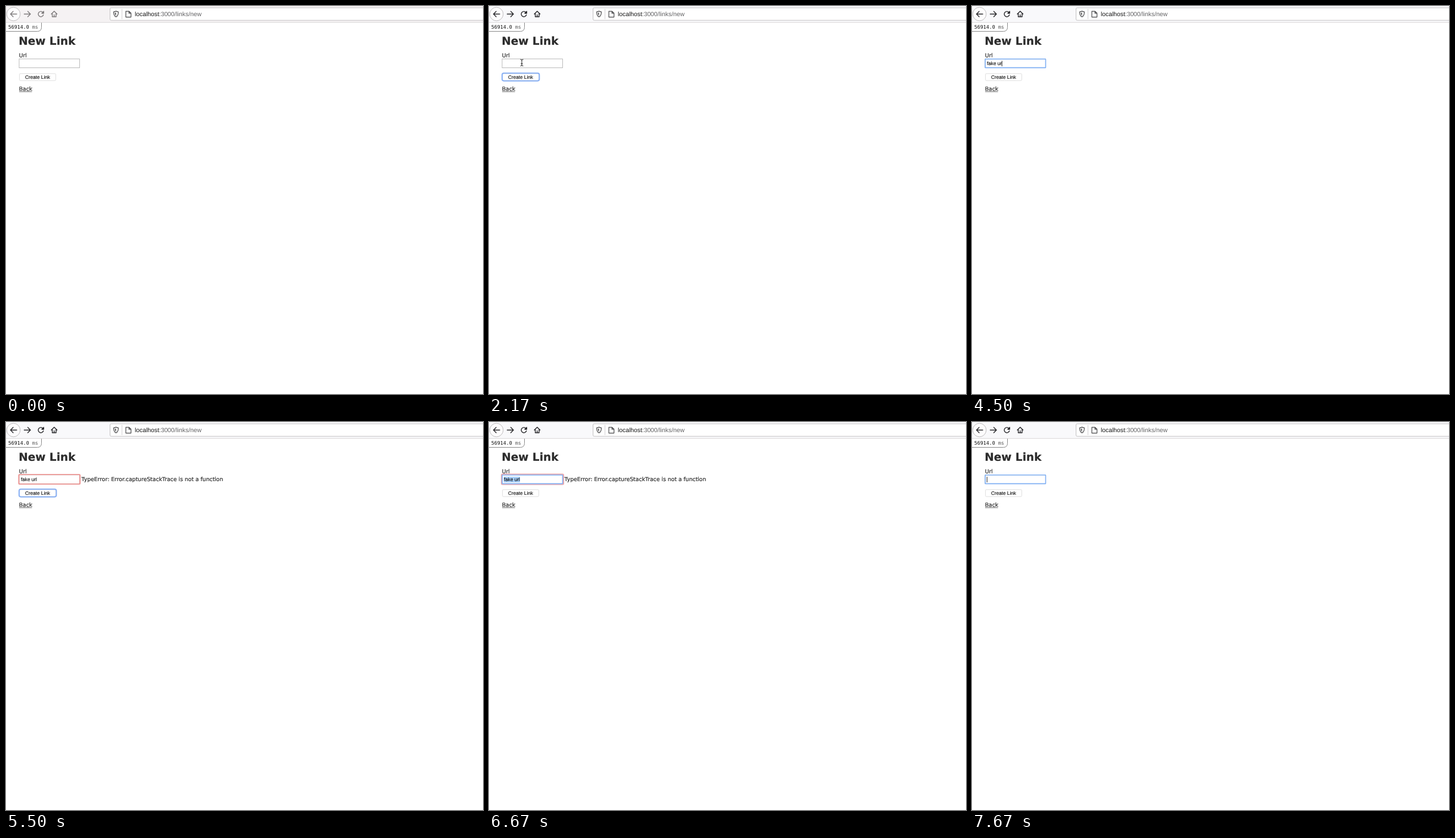
These frames come from a looping animation (800x650 px, 8000 ms). An HTML page:

```html
<!DOCTYPE html>
<html lang="en">
<head>
<meta charset="utf-8">
<title>New Link form</title>
<style>
  html, body { margin: 0; width: 100%; height: 100%; overflow: hidden; background: #fff; }
  svg { display: block; width: 800px; height: 650px; }
  text { white-space: pre; font-kerning: none; text-rendering: geometricPrecision; }
  .page { font: 9.25px "DejaVu Sans", sans-serif; fill: #2c2c2c; stroke: #2c2c2c; stroke-width: .2; }
  .ui { font: 8.2px "Liberation Sans", sans-serif; fill: #0c0c0c; stroke: #0c0c0c; stroke-width: .12; }
  .mono { font: 8.3px "DejaVu Sans Mono", monospace; fill: #111; }
  .address { font: 10.33px "Liberation Sans", sans-serif; fill: #626264; }
  .icon { fill: none; stroke-width: 1.4; stroke-linecap: round; stroke-linejoin: round; }
</style>
</head>
<body>
<svg viewBox="0 0 800 650">
  <defs>
    <filter id="soft" x="-10%" y="-40%" width="120%" height="180%"><feGaussianBlur stdDeviation="0.7"/></filter>
  </defs>
  <rect width="800" height="650" fill="#fff"/>

  <!-- browser toolbar -->
  <rect id="bar" width="800" height="27"/>
  <rect y="27" width="800" height="1" fill="#dcdadb"/>
  <circle cx="12.5" cy="13.5" r="11.3" fill="#fdfcfd" stroke="#b9b7b8" stroke-width=".9"/>
  <g id="nav" class="icon">
    <path d="M18 13.5H7.5M12 9L7.5 13.5L12 18"/>
    <path d="M30.5 13.5H41M36.5 9L41 13.5L36.5 18"/>
    <path d="M62.2 11.2A4.4 4.4 0 1 0 62.7 14.8M63.2 9V12.2H60Z"/>
    <path d="M76 13.6L80.8 8.8L85.6 13.6M77.6 12.6V18H84V12.6M80.8 18V14.8"/>
  </g>
  <rect x="174.5" y="3" width="640" height="21" rx="2" fill="#fff" stroke="#c3c1c3"/>
  <g class="icon" stroke="#4c4c4e" style="stroke-width:1.2">
    <path d="M180.6 9.8L184.5 8.7L188.4 9.8C188.5 14 187.4 16.8 184.5 18.3C181.6 16.8 180.5 14 180.6 9.8Z"/>
    <path d="M184.5 10.9V16C183.1 15 182.6 13.4 182.6 11.4Z" fill="#4c4c4e" stroke="none"/>
    <path d="M201 8.8H206.4L209.6 12V18.6H201ZM206.2 9V12.2H209.4"/>
  </g>
  <path d="M194.5 5V22" stroke="#d2d0d2"/>
  <text class="address" x="216" y="17.4"><tspan fill="#141414">localhost</tspan>:3000/links/new</text>

  <!-- timing badge -->
  <path d="M0 42.5H52.5Q59.5 42.5 59.5 35.5V28" fill="#fff" stroke="#8b8b8b"/>
  <text class="mono" x="3.8" y="38">56914.0 <tspan fill="#555">ms</tspan></text>

  <!-- form -->
  <text class="page" x="21.3" y="65.4" style="font-size:18.5px;font-weight:bold">New Link</text>
  <text class="page" x="21.7" y="86.3">Url</text>
  <rect id="halo" x="21" y="87.5" width="104" height="17" rx="1.5" fill="none" stroke="#f2a9ab" stroke-width="2" filter="url(#soft)"/>
  <rect x="22" y="88.7" width="101.5" height="14.8" fill="#fff" stroke="#b5b5b5" stroke-width=".9"/>
  <rect id="redRing" x="21.5" y="88" width="102.6" height="16" rx="1" fill="none" stroke="#ee8a88" stroke-width="1.7"/>
  <rect id="blueRing" x="22.2" y="88.8" width="101.3" height="14.6" rx=".7" fill="none" stroke="#82b1f3" stroke-width="1.6"/>
  <rect id="selection" x="24.6" y="91.6" width="27.4" height="9.6" fill="#a9d0fa"/>
  <text id="value" class="ui" x="25" y="99"></text>
  <path id="caret" d="M0 91.8V101" stroke="#111" stroke-width=".9"/>
  <text id="error" class="page" x="126.5" y="99.2">TypeError: Error.captureStackTrace is not a function</text>

  <rect x="22.5" y="113.3" width="61" height="11.6" rx="1.6" fill="#fff" stroke="#d9d9d9" stroke-width=".8"/>
  <rect id="buttonRing" x="22" y="112.6" width="62.4" height="12.8" rx="2.8" fill="none" stroke="#8ab1f4" stroke-width="2"/>
  <text class="ui" x="32" y="121.8">Create Link</text>
  <text class="page" x="21.7" y="142.4">Back</text>
  <path d="M22 143.6H43.6" stroke="#444" stroke-width=".8"/>

  <!-- pointers, drawn around their hot spots -->
  <path id="arrow" d="M0 0V11.5L2.7 9L4.5 13.2L6.5 12.3L4.7 8.3H8.3Z" fill="#000" stroke="#fff" stroke-width=".8"/>
  <path id="beam" d="M-2.4 -5.5Q0 -5.5 0 -4V4Q0 5.5 -2.4 5.5M2.4 -5.5Q0 -5.5 0 -4M0 4Q0 5.5 2.4 5.5M-1.5 1.6H1.5" fill="none" stroke="#222" stroke-width="1"/>
</svg>
<script>
  const LOOP = 8000, STEP = 1000 / 6;
  const WORDS = "fake url";
  const KEYS = [3330, 3670, 3830, 4170, 4170, 4330, 4500, 4670];
  const $ = id => document.getElementById(id);
  const show = (id, on) => $(id).setAttribute("visibility", on ? "visible" : "hidden");
  const within = (t, ...spans) => spans.some(([a, b]) => t >= a && t < b);
  const ease = p => p * p * (3 - 2 * p);

  // pointer stops: time, x, y
  const PATH = [[1000, 330, 358], [1500, 62, 117], [1670, 62, 117], [2000, 55, 95]];

  function pointerAt(t) {
    const i = PATH.findIndex(p => t < p[0]);
    if (i < 0) return PATH[PATH.length - 1].slice(1);
    const [t0, x0, y0] = PATH[Math.max(i - 1, 0)], [t1, x1, y1] = PATH[i];
    const p = t1 > t0 ? ease(Math.max(0, (t - t0) / (t1 - t0))) : 0;
    return [x0 + (x1 - x0) * p, y0 + (y1 - y0) * p];
  }

  function draw(t) {
    const active = t >= 1000;
    $("bar").setAttribute("fill", active ? "#f9f9fb" : "#f5f2f3");
    $("nav").setAttribute("stroke", active ? "#29292c" : "#807d7e");

    const inputFocus = within(t, [2330, 5330], [6500, 7170], [7670, LOOP]);
    const invalid = within(t, [5330, 7170]);
    show("blueRing", inputFocus);
    show("redRing", invalid && !inputFocus);
    show("halo", invalid && inputFocus);
    show("error", invalid);
    show("buttonRing", within(t, [1670, 2330], [5330, 6500], [7170, 7670]));
    show("selection", within(t, [6500, 6830]));

    const typed = t < 6830 ? KEYS.filter(k => t >= k).length : 0;
    const value = $("value");
    value.textContent = WORDS.slice(0, typed);
    const end = 25.2 + (typed ? value.getComputedTextLength() : 0);
    $("caret").setAttribute("transform", `translate(${end})`);
    show("caret", within(t, [2330, 2670], [3000, 5170], [6830, 7170], [7670, LOOP]));

    const [x, y] = pointerAt(Math.floor((t + 4) / STEP) * STEP + 4);
    const overInput = x > 22 && x < 124 && y > 88 && y < 104;
    const visible = within(t, [1000, 3330]);
    for (const id of ["arrow", "beam"]) $(id).setAttribute("transform", `translate(${x} ${y})`);
    show("arrow", visible && !overInput);
    show("beam", visible && overInput);
  }

  const start = performance.now();
  function tick() {
    draw((performance.now() - start) % LOOP);
    requestAnimationFrame(tick);
  }
  tick();
</script>
</body>
</html>
```
